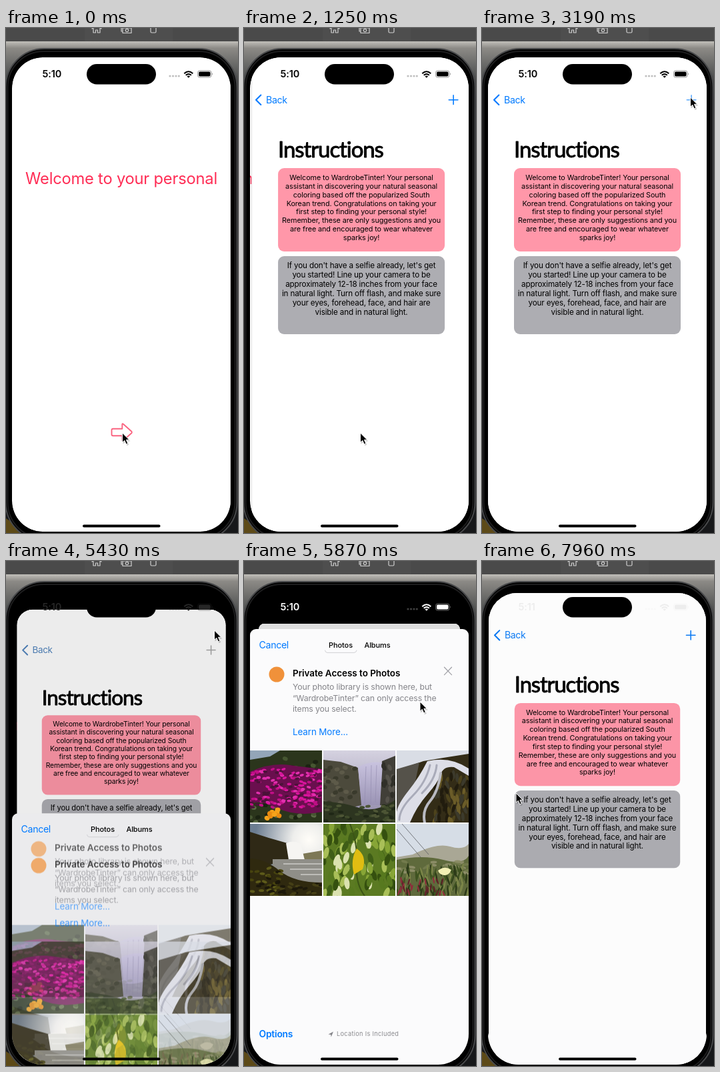
These frames come from a looping animation (348x757 px, 8 s). An HTML page:

```html
<!DOCTYPE html>
<html lang="en">
<head>
<meta charset="utf-8">
<title>Style assistant walkthrough</title>
<style>
  html, body { margin: 0; width: 100%; height: 100%; overflow: hidden; background: #000; }
  svg { display: block; }
  text { font-family: Inter, Roboto, sans-serif; }
  .mid { text-anchor: middle; }
  .blue { fill: #007aff; }
  .line { fill: none; stroke-linecap: round; stroke-linejoin: round; }
</style>
</head>
<body>
<svg width="348" height="757" viewBox="0 0 348 757">
  <defs>
    <linearGradient id="desk" x2="0" y2="1">
      <stop offset="0" stop-color="#c1bfba"/><stop offset=".014" stop-color="#8c8a86"/>
      <stop offset=".06" stop-color="#5c5d5c"/><stop offset=".12" stop-color="#1b1c1e"/>
      <stop offset="1" stop-color="#17181a"/>
    </linearGradient>
    <linearGradient id="mist" x2="0" y2="1">
      <stop offset="0" stop-color="#d5d2e0"/><stop offset="1" stop-color="#8f88a8"/>
    </linearGradient>
    <linearGradient id="fall" x2="0" y2="1">
      <stop offset="0" stop-color="#c9c3df"/><stop offset="1" stop-color="#9a93b4"/>
    </linearGradient>
    <radialGradient id="glow" cx=".82" cy=".22" r=".75">
      <stop offset="0" stop-color="#fffdf8"/><stop offset=".3" stop-color="#eeeeec"/>
      <stop offset="1" stop-color="#6c7d91"/>
    </radialGradient>
    <clipPath id="screen"><rect x="9" y="44" width="328" height="711" rx="46"/></clipPath>
    <clipPath id="cardClip"><rect id="cardShape" x="9" y="44" width="328" height="711"/></clipPath>
  </defs>

  <!-- desktop, simulator toolbar, phone body -->
  <rect y="20" width="348" height="737" fill="url(#desk)"/>
  <path d="M0 735Q12 742 26 757H0Z" fill="#5d4a18"/>
  <rect width="348" height="20" fill="#4a4a4a"/>
  <rect x="118" width="132" height="20" fill="#4e4e4e"/>
  <g class="line" stroke="#cfcfcf" stroke-width="1.2">
    <path d="M129 1l2-2M131 0v7h3.500v-4h3v4h3.500v-7M143 1l-2-2"/>
    <path d="M173 0v5h2M175 0h13v7.500h-13z"/><circle cx="181.500" cy="3.500" r="2.200"/>
    <path d="M217 0v5.500q0 1.500 1.500 1.500h5q1.500 0 1.500-1.500V0"/>
  </g>
  <rect x="-.5" y="31" width="347" height="738" rx="58" fill="#000" stroke="#48494b" stroke-width="2"/>
  <rect x="2.500" y="35" width="341" height="730" rx="54" fill="#000" stroke="#1d1d1e" stroke-width="2"/>

  <g clip-path="url(#screen)">
    <rect x="9" y="44" width="328" height="711"/>
    <g id="card"><g clip-path="url(#cardClip)">
      <rect x="9" y="44" width="328" height="711" fill="#fff"/>
      <g id="welcome">
        <text class="mid" x="173" y="233.500" font-size="23.700" letter-spacing="-.2" fill="#ff2d55">Welcome to your personal</text>
        <path class="line" stroke="#fa6480" stroke-width="1.900" d="M160.500 600.800H174.300V594.500Q174.300 592.300 176 593.800L188 604.500Q189.600 606 188 607.500L176 618.200Q174.300 619.600 174.300 617.500V611.300H160.500Q158.500 611.300 158.500 609.300V602.800Q158.500 600.800 160.500 600.800Z"/>
      </g>
      <g id="page">
        <rect x="8" y="44" width="330" height="711" fill="#dedede"/>
        <rect x="9" y="44" width="329" height="711" fill="#fff"/>
        <text x="48" y="193.800" font-size="33" letter-spacing="-1.100" stroke="#000" stroke-width=".9" stroke-linejoin="round" style="font-family:Lato,sans-serif">Instructions</text>
        <rect x="48" y="210" width="250" height="125" rx="9" fill="#ff97a9"/>
        <text class="mid" data-step="12.900" x="173" y="227.800" font-size="10.850" letter-spacing="-.11">Welcome to WardrobeTinter! Your personal|assistant in discovering your natural seasonal|coloring based off the popularized South|Korean trend. Congratulations on taking your|first step to finding your personal style!|Remember, these are only suggestions and you|are free and encouraged to wear whatever|sparks joy!</text>
        <rect x="48" y="342" width="250" height="117" rx="9" fill="#adadb2"/>
        <text class="mid" data-step="13.950" x="173" y="360.200" font-size="11.700" letter-spacing="-.16">If you don't have a selfie already, let's get|you started! Line up your camera to be|approximately 12-18 inches from your face|in natural light. Turn off flash, and make sure|your eyes, forehead, face, and hair are|visible and in natural light.</text>
      </g>
      <g id="nav">
        <path id="chevron" class="line" stroke-width="2.100" d="M25.300 100.500L18 107.700L25.300 115"/>
        <text id="back" x="33" y="112.600" font-size="14.200" letter-spacing="-.4">Back</text>
        <path id="plus" class="line" stroke-width="1.600" d="M307.300 107.700h13.600M314.100 100.900v13.600"/>
      </g>
      <rect id="dim" x="9" y="44" width="328" height="711"/>
    </g></g>

    <g id="sheet">
      <rect id="paper" x="9" y="102" width="328" height="680" rx="9"/>
      <g id="inner">
        <use id="ghost" href="#content"/>
        <g id="live">
          <g id="content">
            <circle cx="49" cy="170" r="11.500" fill="#f0913a"/>
            <text x="73" y="172.600" font-size="13.500" font-weight="600" letter-spacing="-.05">Private Access to Photos</text>
            <text data-step="16.800" x="73" y="192.700" font-size="12.300" letter-spacing="-.13" fill="#85858a">Your photo library is shown here, but|“WardrobeTinter” can only access the|items you select.</text>
            <text class="blue" x="73" y="260.600" font-size="13.400" letter-spacing="-.1">Learn More...</text>

            <svg x="9" y="284" width="108" height="108">
              <rect width="108" height="108" fill="#2b351c"/>
              <path d="M0 0H45L30 9L0 14Z" fill="#93a5b8"/>
              <g id="hedge"/>
              <path d="M0 32Q30 18 60 22T108 28V92Q70 100 40 86T0 82Z" fill="#6a0f4e"/>
              <g id="blooms"/><g id="poppies"/>
            </svg>
            <svg x="119" y="284" width="108" height="108">
              <rect width="108" height="108" fill="url(#mist)"/>
              <path d="M0 14L26 17L52 26L58 82L0 94Z" fill="#4c4a3c"/>
              <path d="M108 8L88 16L82 82H108Z" fill="#413f38"/>
              <path d="M52 25Q72 14 89 19L85 82H57Z" fill="url(#fall)"/>
              <path d="M64 24L62 80M72 22L71 80M80 22L78 78" stroke="#918aad" opacity=".6"/>
              <g id="cliff"/><g id="ledge"/>
              <path d="M0 76Q30 78 54 86T108 74V108H0Z" fill="#2d3520"/>
              <g id="brush"/>
            </svg>
            <svg x="229" y="284" width="108" height="108">
              <rect width="108" height="108" fill="#332c17"/>
              <path d="M0 0H108V5L70 11L40 16L0 30Z" fill="#d9dde5"/>
              <path d="M0 28L34 18L26 56L0 90Z" fill="#55524a"/>
              <g id="rock"/>
              <path d="M46 16Q34 40 18 60T0 92V108H20Q30 84 46 66T66 36Q70 23 86 25L108 38V27Q80 8 46 16Z" fill="#dddee7"/>
              <path d="M50 22Q44 48 24 68T4 104M60 22Q58 44 38 64" class="line" stroke="#a9abb9" stroke-width="3"/>
              <path d="M66 34Q62 62 50 76T42 108" class="line" stroke="#b9bac2" stroke-width="4"/>
            </svg>
            <svg x="9" y="394" width="108" height="108">
              <rect width="108" height="108" fill="url(#glow)"/>
              <path d="M72 46L108 40V58H72Z" fill="#7d7856"/>
              <path d="M0 12L28 21L56 29L60 56L0 66Z" fill="#2f2916"/>
              <path d="M54 29Q66 24 76 30L82 54H58Z" fill="#f6f5f2"/>
              <path d="M34 53H108V92H34Z" fill="#8f8e88"/>
              <path d="M50 60H108M60 68H108M76 76H108" stroke="#bdbcb8" stroke-width="2"/>
              <path d="M0 52Q22 52 44 70T108 88V108H0Z" fill="#2f290f"/>
              <g id="moss"/><g id="shore"/>
            </svg>
            <svg x="119" y="394" width="108" height="108">
              <rect width="108" height="108" fill="#5b7a22"/>
              <g id="leaves"/>
              <path d="M40 0Q52 30 50 60T62 108" class="line" stroke="#3c5416" stroke-width="2"/>
              <path d="M50 37Q66 48 59 68L46 76Q40 54 50 37Z" fill="#e0bd12"/>
            </svg>
            <svg x="229" y="394" width="108" height="108">
              <rect width="108" height="108" fill="#d6dde6"/>
              <path d="M24 46Q60 28 80 34T108 30V70H0V50Z" fill="#a9a795"/>
              <path d="M0 54Q40 46 70 54T108 48V108H0Z" fill="#5f6a3c"/>
              <path d="M0 8L36 50M8 0L48 46" stroke="#5b5d62" stroke-width=".8"/>
              <g id="dune"/><g id="grass"/><g id="sprigs"/>
              <path d="M62 70Q72 62 82 69Q78 78 71 77T62 70Z" fill="#f2efb4"/>
            </svg>
            <g id="picked">
              <rect x="9" y="284" width="108" height="108" fill="#fff" opacity=".28"/>
              <circle cx="103" cy="378" r="8.700" fill="#0a7aff" stroke="#fff" stroke-width="1.400"/>
              <path class="line" stroke="#fff" stroke-width="1.400" d="M99.300 378.600L102 381.800L106.800 374.400"/>
            </g>
          </g>
          <path class="line" stroke="#a2a2a8" stroke-width="1.300" d="M300.500 159.200l11 11.400M311.500 159.200l-11 11.400"/>
        </g>
        <text class="blue" x="22.500" y="130.600" font-size="14.200" letter-spacing="-.35">Cancel</text>
        <path d="M121.500 134Q122 137.400 125 137.400H165Q168.500 137.400 169 134" class="line" stroke="#d0d0d4"/>
        <g class="mid" font-size="11" font-weight="500" letter-spacing="-.1">
          <text x="145" y="129.600">Photos</text><text x="200" y="129.600">Albums</text>
        </g>
        <text class="blue" x="22.500" y="714" font-size="13.800" font-weight="600" letter-spacing="-.2">Options</text>
        <path d="M126.500 709.500L134 705.500L130.700 713.500L130.200 709.900Z" fill="#85858a"/>
        <text x="139" y="712.400" font-size="9.200" letter-spacing=".3" fill="#8a8a8e">Location Is Included</text>
      </g>
    </g>
  </g>

  <rect x="121" y="54" width="104" height="30.500" rx="15.250"/>
  <g id="status">
    <text id="clock" x="54.600" y="74.200" font-size="14.500" font-weight="600" letter-spacing="-.2"></text>
    <g opacity=".25"><circle cx="246" cy="72" r="1.600"/><circle cx="250.500" cy="72" r="1.600"/><circle cx="255" cy="72" r="1.600"/><circle cx="259.300" cy="72" r="1.600"/></g>
    <path class="line" stroke="currentColor" stroke-width="2" style="stroke-linecap:butt" d="M267.300 68.200Q273.800 62.200 280.300 68.200M269.700 70.800Q273.800 67.200 277.900 70.800"/>
    <path d="M271.500 72.400Q273.800 70.700 276.100 72.400L273.800 74.700Z"/>
    <rect x="287.500" y="64" width="20.500" height="10" rx="3" fill="none" stroke="currentColor" stroke-opacity=".4"/>
    <rect x="289" y="65.500" width="17.500" height="7" rx="1.800"/>
    <path d="M309.200 67.300q1.500 1.700 0 3.400z" opacity=".5"/>
  </g>
  <rect x="115" y="744.600" width="116.500" height="4" rx="2"/>
  <g id="cursor">
    <path d="M1 1.500V16.500L4.500 13.500L7 19L9.800 17.800L7.500 12.500H12Z" opacity=".2"/>
    <path d="M0 0V14.200L3.300 11.300L5.700 16.800L8.300 15.700L5.900 10.300H10.300Z" stroke="#fff" stroke-width="1" stroke-linejoin="round"/>
  </g>
</svg>

<script>
const $ = id => document.getElementById(id);
const set = (id, attrs) => { for (const k in attrs) $(id).setAttribute(k, attrs[k]); };
const shift = (x, y) => `translate(${x} ${y})`;
const clamp = v => Math.min(1, Math.max(0, v));
const mix = (a, b, u) => a + (b - a) * u;
const rgb = (a, b, u) => `rgb(${a.map((v, i) => Math.round(mix(v, b[i], u)))})`;

// Multi-line text
for (const el of document.querySelectorAll('[data-step]')) {
  const x = el.getAttribute('x'), step = el.dataset.step;
  el.innerHTML = el.textContent.split('|')
    .map((s, i) => `<tspan x="${x}" dy="${i ? step : 0}">${s}</tspan>`).join('');
}

// Scattered foliage and rock texture
let seed = 7;
const rand = () => (seed = seed * 16807 % 2147483647) / 2147483647;
function scatter(id, count, [x, y, w, h], rx, ry, colors) {
  let out = '';
  for (let i = 0; i < count; i++) {
    const cx = x + rand() * w, cy = y + rand() * h, tilt = rand() * 50 - 25;
    out += `<ellipse rx="${rx}" ry="${ry}" fill="${colors[i % colors.length]}"
      transform="translate(${cx.toFixed(1)} ${cy.toFixed(1)}) rotate(${tilt.toFixed()})"/>`;
  }
  $(id).innerHTML = out;
}
scatter('hedge', 50, [0, 12, 108, 96], 4, 3, ['#465631', '#1b2312', '#5b6b45']);
scatter('blooms', 190, [0, 28, 108, 58], 3.2, 1.8, ['#d8149c', '#c00f86', '#e22fae', '#4a1238']);
scatter('poppies', 9, [20, 86, 24, 16], 4, 3.5, ['#f5a31a', '#e88a10']);
scatter('cliff', 30, [0, 24, 50, 56], 4, 3, ['#5d5a49', '#3a3a2c']);
scatter('ledge', 16, [90, 20, 18, 56], 3, 5, ['#55524a', '#302f28']);
scatter('brush', 40, [0, 82, 108, 26], 4, 2, ['#3f4a2b', '#1f2716', '#4d5535']);
scatter('rock', 60, [56, 36, 52, 72], 2.5, 7, ['#4d431c', '#211c0e', '#6b5c28', '#3c3a2c']);
scatter('moss', 36, [0, 66, 48, 42], 4, 2, ['#5d5a1a', '#1b170a', '#47430f']);
scatter('shore', 22, [48, 90, 60, 18], 4, 2, ['#453f16', '#1d190b']);
scatter('leaves', 90, [0, 0, 108, 108], 4, 9, ['#87a536', '#3f5e17', '#a9bf58', '#57791f', '#dbe2b0', '#35500f']);
scatter('dune', 30, [0, 56, 108, 20], 5, 2, ['#8b8c66', '#727a4c']);
scatter('grass', 100, [0, 66, 108, 42], 1.3, 8, ['#3f5321', '#7b8548', '#2c3a18']);
scatter('sprigs', 28, [0, 84, 75, 22], 1.2, 5, ['#8e2f3c', '#5f2428']);

const ticks = [0, 960, 1110, 1250, 1400, 1690, 1840, 1990, 2140, 2290, 2440, 2590, 2890, 3040, 3190,
  5430, 5580, 5720, 5870, 6020, 6170, 6320, 6470, 6620, 7210, 7810, 7960];
const pointer = [[5580, 312.5, 104], [5870, 264, 211], [6170, 150, 290], [6470, 52, 343], [6620, 51, 348]];
const settle = (t, start) => t < start ? 1 : Math.exp((start - t) / 75);

function pointerAt(t) {
  if (t <= 2590) {
    const u = clamp((t - 1540) / 1050), e = u * u * (3 - 2 * u);
    return [mix(174.5, 312.5, e), mix(607, 104, e)];
  }
  const i = pointer.findIndex(k => k[0] >= t);
  if (i < 0) return [51, 348];
  const b = pointer[i], a = pointer[i - 1] || [0, 312.5, 104];
  const u = (t - a[0]) / (b[0] - a[0]);
  return [mix(a[1], b[1], u), mix(a[2], b[2], u)];
}

function draw(time) {
  const t = ticks.filter(k => k <= time).pop();

  // Push to the instructions page
  const left = t < 960 ? 1 : t < 1400 ? settle(t, 900) : 0;
  set('welcome', { transform: shift(-98 * (1 - left), 0) });
  set('page', { transform: shift(328 * left, 0) });
  set('nav', { opacity: 1 - left });

  // Photo sheet; the card behind it shrinks and darkens
  const closing = t >= 7810;
  const rest = t < 5430 ? 1 : t < 5870 ? settle(t, 5365.5) : 0;
  const p = closing ? 0.59 * settle(t, 7810) : 1 - rest;
  const s = 1 - 0.08 * p;
  set('card', { transform: shift(173 * (1 - s), 44 + 50 * p - 44 * s) + ` scale(${s})` });
  set('cardShape', { rx: mix(46, 9, p) });
  set('dim', { opacity: 0.13 * p });
  set('sheet', { transform: shift(0, 653 * (1 - p)) });
  set('paper', { fill: rgb([251, 251, 252], [214, 214, 216], rest) });
  set('inner', { opacity: closing ? clamp(p * 3 - 0.25) : 1 });
  set('ghost', { transform: shift(0, -35 * rest), opacity: clamp(rest * 1.4) });
  set('live', { transform: shift(0, 24 * rest), opacity: 1 - rest * 0.65 });
  set('picked', { visibility: t >= 7210 ? 'visible' : 'hidden' });

  // Tint and button highlight
  const tint = rgb([0, 122, 255], [140, 140, 140], p);
  const press = t < 2890 || closing ? 1 : t < 3040 ? 0.3 : t < 3190 ? 0.45 : 0.65;
  set('back', { fill: tint });
  set('chevron', { stroke: tint });
  set('plus', { stroke: t >= 5430 && !closing ? '#777' : tint, opacity: press });

  // Status bar
  const light = t < 5430 ? 0 : t < 5580 ? 0.15 : t < 5720 ? 0.6 : t < 7960 ? 1 : 0.93;
  const ink = rgb([0, 0, 0], [255, 255, 255], light);
  set('status', { fill: ink, color: ink });
  $('clock').textContent = closing ? '5:11' : '5:10';

  set('cursor', { transform: shift(...pointerAt(t)) });
}

const begin = performance.now();
function loop() {
  draw((performance.now() - begin) % 8000);
  requestAnimationFrame(loop);
}
loop();
</script>
</body>
</html>
```
